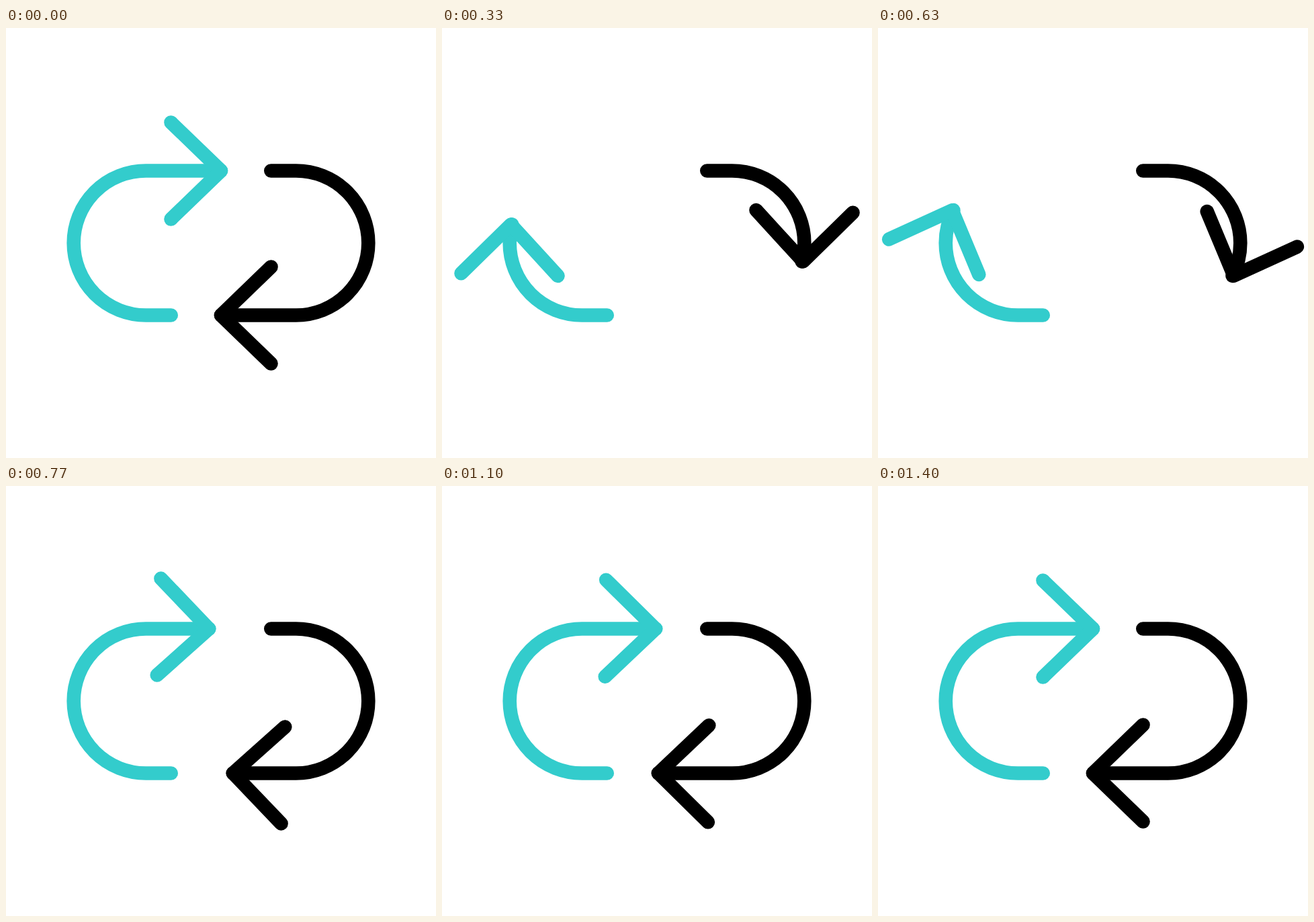
Recreate the animation shown at these times as an HTML page. Size 640 by 640 pixels, loop 2000 ms.

```html
<!DOCTYPE html>
<html lang="en">
<head>
<meta charset="utf-8">
<title>Cycle arrows</title>
<style>
  html, body { margin: 0; width: 100%; height: 100%; overflow: hidden; background: #fff; }
  svg { display: block; width: 100vw; height: 100vh; }
  g { fill: none; stroke-width: 20.6; stroke-linecap: round; stroke-linejoin: round; }
</style>
</head>
<body>
<svg viewBox="0 0 640 640">
  <g stroke="#33cccc"><path class="stem"/><path class="head"/></g>
  <g stroke="#000" transform="rotate(180 320 320)"><path class="stem"/><path class="head"/></g>
</svg>
<script>
const LOOP = 2000;
const R = 107.5, CX = 208.2, CY = 320;   // bend of the stem
const TIP = 320, TAIL = 245.7;           // ends of the stem
const STRAIGHT = TIP - CX;
const LENGTH = TAIL - CX + Math.PI * R + STRAIGHT;

// [frame, value, start slope of the segment that follows]
const pull = [[0, 0, 0.89], [16, 332], [24.15, 0], [28.5, 95], [32.5, 0], [37, 60.5], [42, 0]];
const turn = [[0, 0, 0.12], [16, -127.5], [22.4, 2.4], [24, 2], [28.5, -26.7], [32.5, 0.6], [36, 0]];

const stems = document.querySelectorAll('.stem');
const heads = document.querySelectorAll('.head');
const setAll = (nodes, name, value) => nodes.forEach(n => n.setAttribute(name, value));

setAll(stems, 'd', `M${TAIL} ${CY + R}H${CX}A${R} ${R} 0 0 1 ${CX} ${CY - R}H${TIP}`);
setAll(heads, 'd', 'M-74.5 -72L0 0L-74.5 72');

function valueAt(keys, frame) {
  const i = keys.findIndex(k => k[0] > frame);
  if (i < 0) return keys[keys.length - 1][1];
  const [f0, v0, slope = 0] = keys[i - 1];
  const [f1, v1] = keys[i];
  const x = (frame - f0) / (f1 - f0);
  const eased = x * x * (3 - 2 * x) + slope * x * (1 - x) * (1 - x);
  return v0 + (v1 - v0) * eased;
}

// Position of the head after sliding back by s along the stem
function pointAt(s) {
  if (s <= STRAIGHT) return [TIP - s, CY - R];
  const a = (s - STRAIGHT) / R;
  const bulge = 2 * Math.sin(Math.PI * (s - STRAIGHT) / (332 - STRAIGHT));
  return [CX - R * Math.sin(a) - bulge, CY - R * Math.cos(a)];
}

function draw(ms) {
  // 30 steps per second, on a 10 ms clock
  const frame = Math.floor((Math.floor((ms % LOOP) / 10) + 0.34) * 0.3);
  const s = valueAt(pull, frame);
  const [x, y] = pointAt(s);
  setAll(stems, 'stroke-dasharray', `${LENGTH - s} ${LENGTH * 2}`);
  setAll(heads, 'transform', `translate(${x} ${y}) rotate(${valueAt(turn, frame)})`);
}

let start;
function tick(now) {
  if (start === undefined) start = now;
  draw(Math.max(0, now - start));
  requestAnimationFrame(tick);
}
draw(0);
requestAnimationFrame(tick);
</script>
</body>
</html>
```
